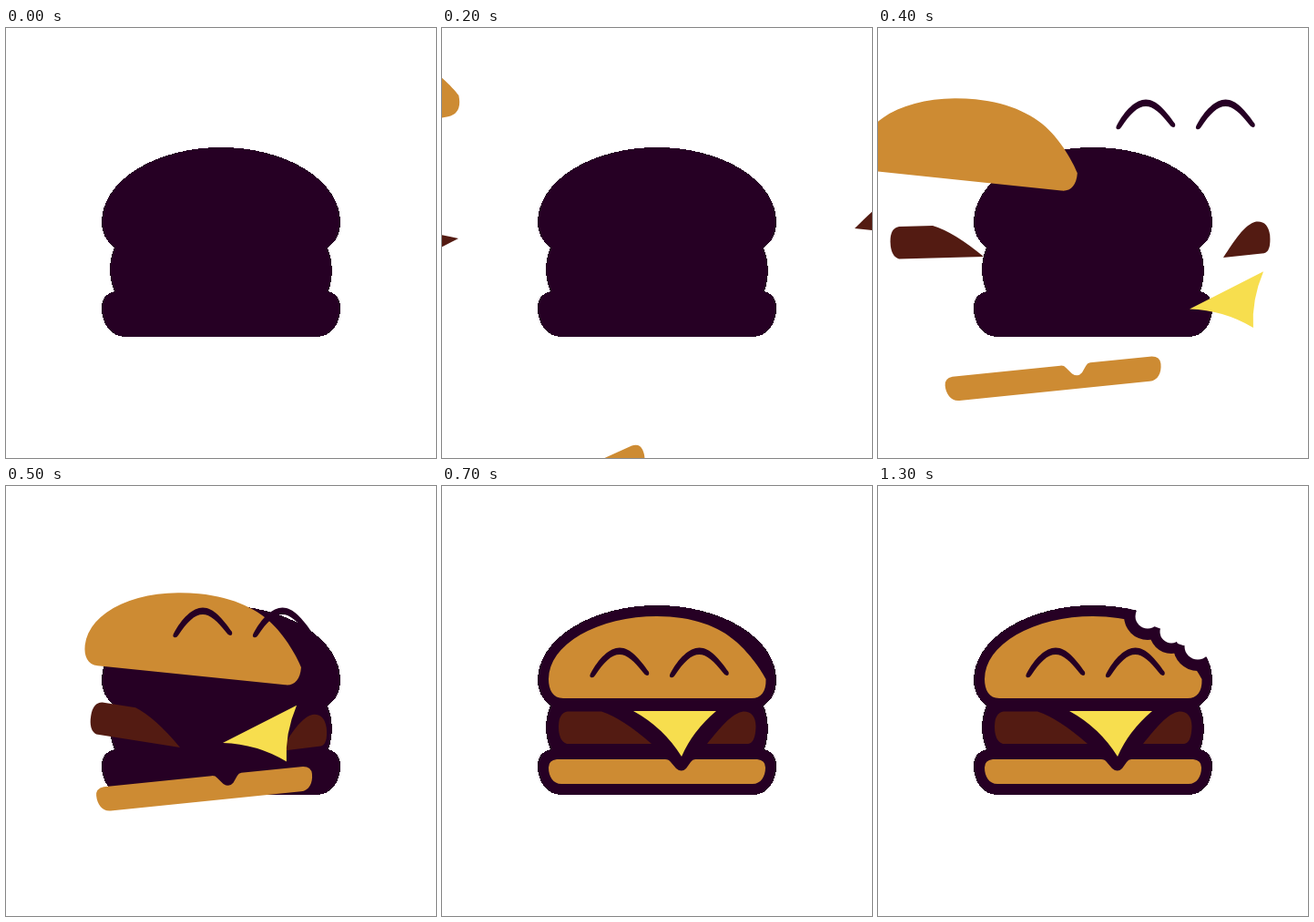
These frames come from a looping animation (472x472 px, 2000 ms). An HTML page:

```html
<!DOCTYPE html>
<html lang="en">
<head>
<meta charset="utf-8">
<title>Burger</title>
<style>
html, body { margin: 0; height: 100%; overflow: hidden; background: #fff; }
svg { display: block; width: 100vw; height: 100vh; }
</style>
</head>
<body>
<svg viewBox="0 0 472 472">
  <defs>
    <path id="shape" shape-rendering="crispEdges" d="M105 213A131 82 0 0 1 367 213Q367 232 353 241Q362 265 354 289Q367 293 367 307C367 325 357 339 341 339H131C115 339 105 325 105 307Q105 293 119 289Q109 265 119 241Q105 230 105 213Z"/>
    <clipPath id="inside"><use href="#shape"/></clipPath>
  </defs>
  <use href="#shape" fill="#260024"/>
  <g id="meatLeft" fill="#531b12">
    <path d="M128 264Q128 249 138 247.5H175Q198 255 230 283H137Q128 280 128 264Z"/>
  </g>
  <g id="meatRight" fill="#531b12">
    <path d="M291 283C305 266 318 249 331 247.5Q344 247.5 344.5 264Q344 282 336 283Z"/>
  </g>
  <g id="bottomBun" fill="#cd8b33">
    <path d="M126 300H245Q249 300 251 303L257 310Q263 315 268 310L273 303Q275 300 278 300H346Q355 301 355 309C355 319 350 327 341 327H131C122 327 117 319 117 309Q117 301 126 300Z"/>
  </g>
  <g id="cheese" fill="#f7de4e">
    <path d="M210 247H301Q275 269 263 297Q243 265 210 247Z"/>
  </g>
  <g id="topBun" fill="#cd8b33">
    <path d="M117 212A119 69 0 0 1 236 143C275 143 304 154 323 171C338 184 351 203 355.5 212C356 226 350 233 340 233H133C122 233 117 224 117 212Z"/>
  </g>
  <g id="eyes" fill="#260024">
    <path id="eye" d="M163 206C172 189 184 177.5 195 177.5C207 177.5 217 190 227 204Q228 208 225 208Q223 208 221 205C211 192 203 185 195 185C186 185 178 193 168 208Q166 211 163.5 210Q161.5 209 163 206Z"/>
    <use href="#eye" x="87.5"/>
  </g>
  <g id="bite">
    <g fill="#260024" clip-path="url(#inside)">
      <circle cx="296" cy="143" r="26"/>
      <circle cx="322" cy="160" r="24"/>
      <circle cx="351" cy="176" r="27"/>
    </g>
    <g fill="#fff">
      <circle cx="296" cy="143" r="13.5"/>
      <circle cx="322" cy="160" r="12.5"/>
      <circle cx="351" cy="176" r="14.5"/>
      <path d="M283 100V136L296 143L303 154L311 157L322 160L329 173L335 175L351 176L362 189H380V100Z"/>
    </g>
  </g>
</svg>
<script>
const LOOP = 2000, STEP = 100, BITE_AT = 1300;
const ARRIVE = 3, SETTLE = 0.15;

// Three key poses on the way in: [dx, dy, degrees] away from rest
const parts = [
  { id: "meatLeft", pivot: [230, 283], path: [[-163, -42, -14.5], [-114, -32, -1.5], [-39, 4, 9]] },
  { id: "meatRight", pivot: [291, 283], path: [[125, -47, 0], [88, -31, -6], [10, 8, -7]] },
  { id: "bottomBun", pivot: [236, 313.5], path: [[-83, 137, -15], [-43.5, 71.5, -5.8], [-18, 19, -5.8]] },
  { id: "cheese", pivot: [210, 247], path: [[211, 101.5, -27], [132, 61.5, -27], [28, 35, -27]] },
  { id: "topBun", pivot: [236, 188], path: [[-236.5, -91, -2], [-133.5, -65, 6], [-28.5, -25, 5.8]] },
  { id: "eyes", pivot: [238, 193], path: [[175, -163, 0], [99, -99, 0], [21, -44, 0]] }
];

const el = id => document.getElementById(id);
const show = (id, on) => el(id).style.display = on ? "" : "none";

// Straight flight up to the first key pose, a short settling after the last
function poseAt([first, second, last], step) {
  const i = step - ARRIVE;
  if (i < 0) return first.map((v, k) => v + (v - second[k]) * -i);
  if (i < 3) return [first, second, last][i];
  return last.map(v => i === 3 ? v * SETTLE : 0);
}

function draw(now) {
  const t = now % LOOP;
  const step = Math.floor(t / STEP);
  for (const { id, pivot, path } of parts) {
    const [dx, dy, turn] = poseAt(path, step);
    el(id).setAttribute("transform", `translate(${dx} ${dy}) rotate(${turn} ${pivot})`);
    show(id, step > 0);
  }
  show("bite", t >= BITE_AT);
}

const start = performance.now();
function tick() {
  draw(performance.now() - start);
  requestAnimationFrame(tick);
}
tick();
</script>
</body>
</html>
```
